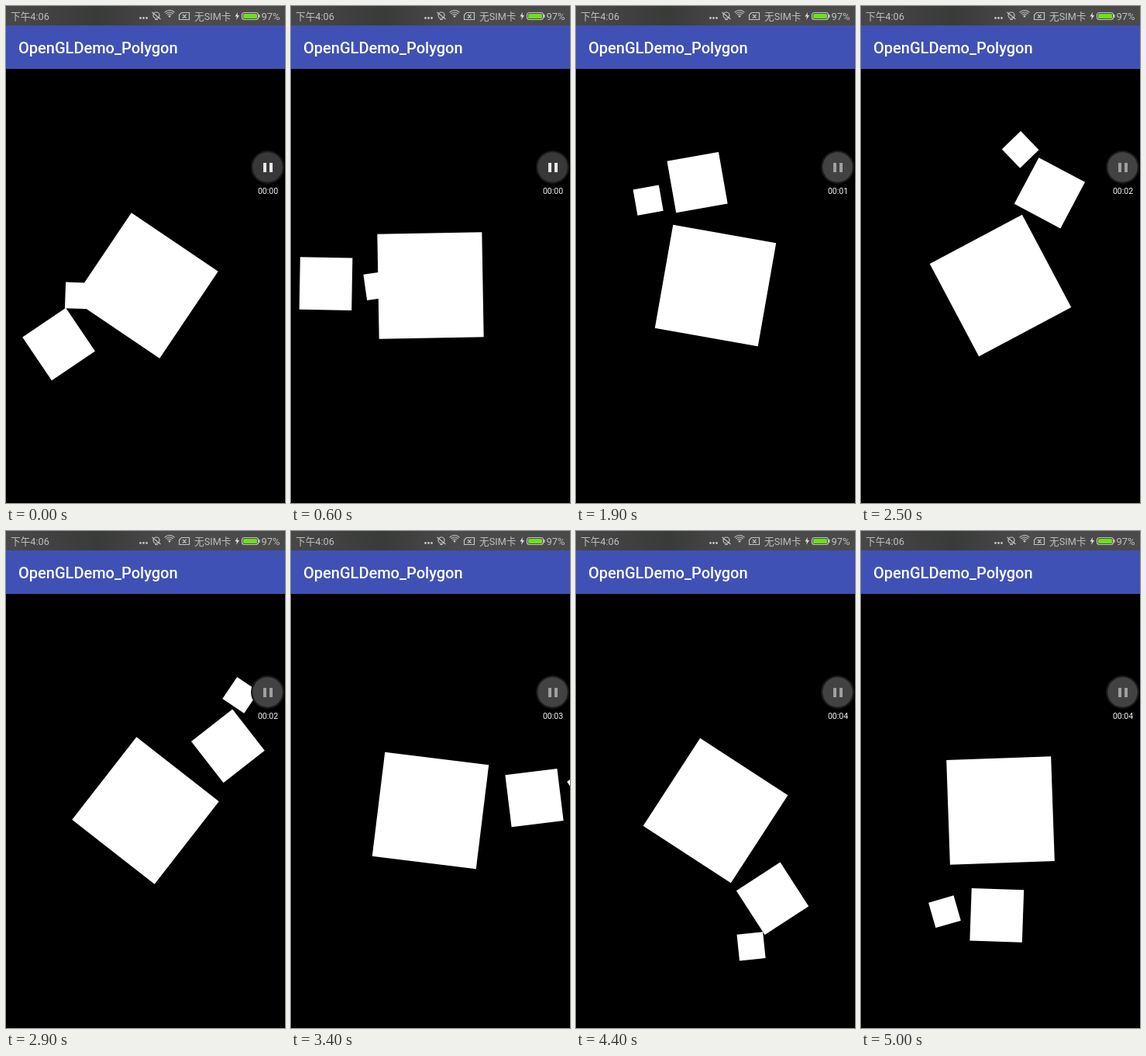
Write an HTML page with a canvas that moves like this. It is 360 px wide and 640 px high and loops after 5100 ms.

```html
<!DOCTYPE html>
<html lang="zh">
<head>
<meta charset="utf-8">
<title>Rotating squares</title>
<style>
html, body { margin: 0; width: 100%; height: 100%; overflow: hidden; background: #000; }
canvas { display: block; width: 360px; height: 640px; }
</style>
</head>
<body>
<canvas id="stage" width="360" height="640"></canvas>
<script>
const ctx = document.getElementById('stage').getContext('2d');
const LOOP = 5100, STEP = 100;
const GLITCH = { from: 3600, to: 4100 };
const SANS = 'Roboto, "Noto Sans CJK SC", "Noto Sans CJK", sans-serif';
const RAD = Math.PI / 180;

// [time in ms, orbit angle in degrees]
const ORBIT = [[0, 146], [1200, 215], [2500, 298], [3400, 353], [3900, 386],
  [4400, 417], [4800, 443], [5000, 452]];

function orbitAt(t) {
  const i = Math.max(1, ORBIT.findIndex(([time]) => time >= t));
  const [t0, a0] = ORBIT[i - 1], [t1, a1] = ORBIT[i];
  return Math.round(a0 + (a1 - a0) * (t - t0) / (t1 - t0));
}

function rect(x, y, w, h, color) {
  ctx.fillStyle = color;
  ctx.fillRect(x, y, w, h);
}

function disc(x, y, r, color) {
  ctx.fillStyle = color;
  ctx.beginPath();
  ctx.arc(x, y, r, 0, 2 * Math.PI);
  ctx.fill();
}

function roundRect(x, y, w, h, r) {
  ctx.beginPath();
  ctx.roundRect(x, y, w, h, r);
}

function polyline(points) {
  ctx.beginPath();
  points.forEach(([x, y]) => ctx.lineTo(x, y));
}

function label(text, x, y, size, color, weight = 400, align = 'left') {
  ctx.font = `${weight} ${size}px ${SANS}`;
  ctx.textAlign = align;
  ctx.fillStyle = color;
  ctx.fillText(text, x, y);
}

// Nested transforms: the large square spins back, the others orbit forward.
function squares(angle) {
  const at = (parent, deg, dist) => ({
    x: parent.x + dist * Math.cos(deg * RAD),
    y: parent.y + dist * Math.sin(deg * RAD)
  });
  const large = { x: 180, y: 360, side: 135, turn: -angle };
  const medium = { ...at(large, angle, 135), side: 67.5, turn: angle };
  const small = { ...at(medium, 2 * angle, 67.5), side: 33.75, turn: -8 * angle };
  return [large, medium, small];
}

function withSquare({ x, y, side, turn }, paint) {
  ctx.save();
  ctx.translate(x, y);
  ctx.rotate(turn * RAD);
  paint(-side / 2, -side / 2, side, side);
  ctx.restore();
}

function fillSquare(square, color) {
  withSquare(square, (x, y, w, h) => rect(x, y, w, h, color));
}

function traceSquare(square) {
  withSquare(square, (x, y, w, h) => {
    ctx.strokeStyle = '#00c800';
    ctx.lineWidth = 0.8;
    ctx.setLineDash([3, 5, 1, 7, 6, 3, 2, 11]);
    ctx.strokeRect(x, y, w, h);
  });
}

function statusIcons() {
  const gray = '#c4c4c4';
  ctx.strokeStyle = gray;
  ctx.lineWidth = 1.2;
  for (const x of [173.5, 177.5, 181.5]) disc(x, 15.5, 1.4, gray);

  // Muted bell
  ctx.beginPath();
  ctx.arc(194, 12, 4, 0, 2 * Math.PI);
  ctx.moveTo(188.5, 8);
  ctx.lineTo(199.5, 17);
  ctx.moveTo(192, 17.5);
  ctx.lineTo(196, 17.5);
  ctx.stroke();

  // Wireless arcs
  for (const r of [3.5, 6, 8.5]) {
    ctx.beginPath();
    ctx.arc(211, 14, r, -Math.PI * 0.77, -Math.PI * 0.23);
    ctx.stroke();
  }
  disc(211, 13.2, 1.3, gray);

  // Missing card
  polyline([[226.5, 8.5], [236.5, 8.5], [236.5, 17.5], [223.5, 17.5], [223.5, 11.5]]);
  ctx.closePath();
  ctx.moveTo(228, 11);
  ctx.lineTo(232.5, 15.5);
  ctx.moveTo(232.5, 11);
  ctx.lineTo(228, 15.5);
  ctx.stroke();

  // Charging bolt and battery
  ctx.fillStyle = '#e0e0e0';
  polyline([[299, 8], [295.5, 13.5], [298, 13.5], [297, 18], [301, 12], [298.5, 12]]);
  ctx.fill();
  roundRect(304.5, 8.5, 21, 9, 3);
  ctx.stroke();
  rect(326, 11, 1.5, 4, gray);
  ctx.fillStyle = '#6be01c';
  roundRect(306, 10, 18, 6, 1.5);
  ctx.fill();
}

function statusBar() {
  const shade = ctx.createLinearGradient(0, 0, 360, 0);
  shade.addColorStop(0, '#484848');
  shade.addColorStop(0.33, '#393b39');
  shade.addColorStop(0.6, '#4b4b4b');
  shade.addColorStop(1, '#4a4a4a');
  rect(0, 0, 360, 25, shade);
  label('下午4:06', 6, 18, 12.7, '#c0c0c0');
  label('无SIM卡', 243, 18, 12.7, '#c0c0c0');
  label('97%', 329.5, 17.5, 13, '#c0c0c0');
  statusIcons();
}

function titleBar(back, ink) {
  rect(0, 25, 360, 56, back);
  label('OpenGLDemo_Polygon', 16, 61, 20, ink, 500);
}

function recorder(t) {
  const fade = Math.min(1, Math.max(0, (t - 1300) / 300));
  const gray = (from, to) => {
    const v = Math.round(from + (to - from) * fade);
    return `rgb(${v},${v},${v})`;
  };
  disc(337.5, 207.5, 21.5, '#191919');
  disc(337.5, 207.5, 19.3, gray(56, 66));
  const bar = gray(232, 160);
  rect(332, 202, 4, 12, bar);
  rect(340, 202, 4, 12, bar);
  const seconds = Math.min(4, Math.floor(t / 1000));
  label('00:0' + seconds, 338, 241.5, 10.5, '#f4f4f4', 400, 'center');
}

function drawNormal(t) {
  rect(0, 0, 360, 640, '#000');
  statusBar();
  titleBar('#3f51b5', '#fff');
  squares(orbitAt(t)).forEach(square => fillSquare(square, '#fff'));
  recorder(t);
}

function drawGlitch(t) {
  rect(0, 0, 360, 640, '#000');
  statusBar();
  rect(232, 20, 8, 1, '#000');
  rect(240, 22, 16, 1, '#000');
  rect(256, 16, 104, 9, '#000');
  rect(232, 16, 24, 1, '#000');
  rect(0, 24, 360, 1, '#000');
  titleBar('#000048', '#000');

  const dark = '#001c00', green = '#008800';
  rect(0, 208, 360, 48, dark);
  rect(128, 200, 232, 4, dark);
  rect(136, 204, 224, 4, dark);
  rect(0, 256, 360, 384, green);
  rect(160, 248, 200, 8, green);

  const [large, medium, small] = squares(orbitAt(t));
  traceSquare(large);
  traceSquare(medium);
  fillSquare(small, '#1eff00');
}

const start = performance.now();

function frame() {
  const elapsed = (performance.now() - start) % LOOP;
  const t = Math.floor(elapsed / STEP) * STEP;
  if (t >= GLITCH.from && t < GLITCH.to) drawGlitch(t);
  else drawNormal(t);
  requestAnimationFrame(frame);
}
frame();
</script>
</body>
</html>
```
